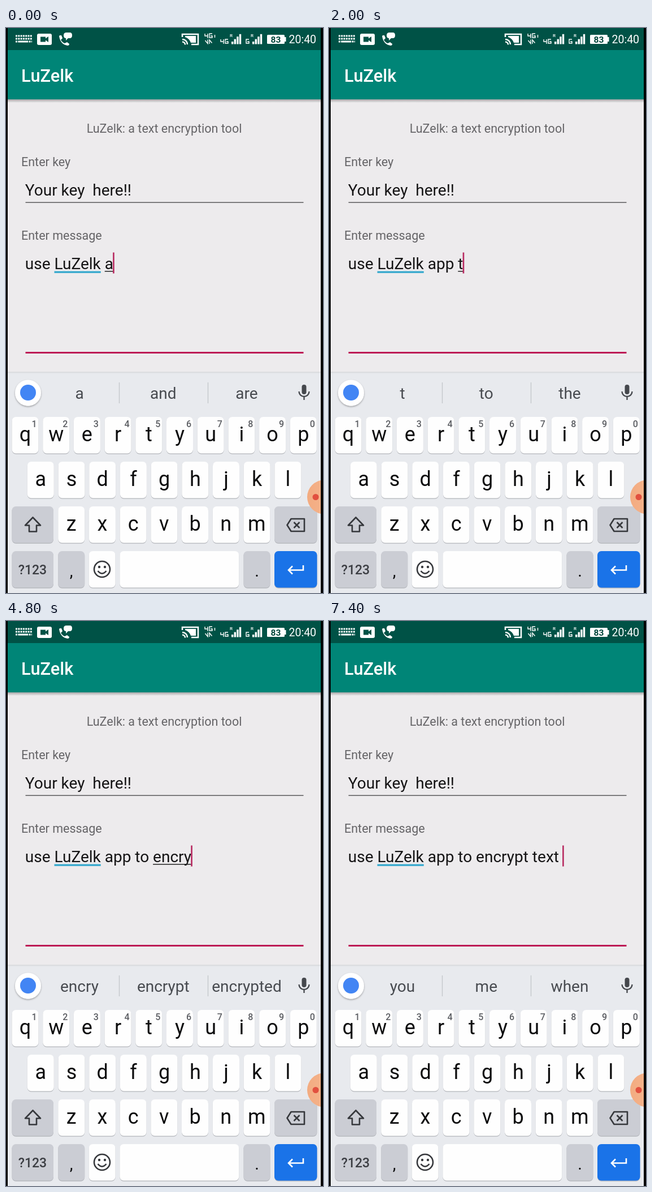
An HTML page that plays this animation: 561x998 px, repeating every 8 s.

```html
<!DOCTYPE html>
<html lang="en">
<head>
<meta charset="utf-8">
<title>Text encryption tool</title>
<style>
html, body { margin: 0; width: 100%; height: 100%; overflow: hidden; background: #000; }
svg { display: block; width: 100%; height: 100%; }
text { font-family: Roboto, sans-serif; white-space: pre; }
.mid { text-anchor: middle; }
.label { font-size: 21.5px; fill: #656467; }
.field { font-size: 28px; fill: #151415; }
.key { font-size: 36px; fill: #0c0c0d; }
.hint { font-size: 16px; font-weight: 500; fill: #5b5d62; }
.word { font-size: 28px; fill: #484b50; }
.line { fill: none; stroke: #36383c; stroke-width: 2.6; }
.tiny { font-size: 8px; font-weight: 500; }
</style>
</head>
<body>
<svg id="stage" viewBox="0 0 561 998" preserveAspectRatio="none">
  <defs>
    <clipPath id="screen"><rect x="3" width="554" height="998"/></clipPath>
    <linearGradient id="drop" x2="0" y2="1">
      <stop stop-color="#000" stop-opacity=".3"/><stop offset="1" stop-color="#000" stop-opacity="0"/>
    </linearGradient>
    <linearGradient id="peach">
      <stop stop-color="#f3ab80"/><stop offset="1" stop-color="#f6bb97"/>
    </linearGradient>
    <filter id="soft" x="-30%" y="-30%" width="160%" height="160%">
      <feDropShadow dx="0" dy="1.5" stdDeviation="1.8" flood-opacity=".35"/>
    </filter>
  </defs>
  <rect width="561" height="998"/>
  <g clip-path="url(#screen)">
    <rect width="561" height="998" fill="#edebed"/>
    <rect y="126" width="561" height="6" fill="url(#drop)"/>
    <rect y="39" width="561" height="87" fill="#008577"/>
    <rect width="561" height="39" fill="#005246"/>
    <g id="status" fill="#fff">
      <g fill="none" stroke="#fff" stroke-width="3">
        <path d="M17 14h29M17 19h29" stroke-dasharray="3 1.3"/>
        <path d="M17 24h29" stroke-dasharray="3 1.3 18 1.3"/>
      </g>
      <rect x="55" y="10" width="26" height="20" rx="3"/>
      <path d="M61 15.500h9v3l5-3.500v10l-5-3.500v3h-9z" fill="#005246"/>
      <path d="M94 14q2-2 4-1l2 5-3 3q3 5 7 6l4-2 4 3q0 3-3 3Q96 29 94 14z"/>
      <path d="M107 8h6q4 0 4 5t-4 5h-3l-4 4v-4q-4 0-4-5t5-5z"/>
      <path d="M312 16v-5h28v18h-12M312 20a9 9 0 0 1 9 9M312 24.500a5 5 0 0 1 5 5" fill="none" stroke="#fff" stroke-width="2.500"/>
      <path d="M317 14h19v12h-9a16 16 0 0 0-10-10z"/>
      <g fill="none" stroke="#fff" stroke-width="1.400">
        <path d="M352 10v4h5m0-4v8m8-8h-5v7h5v-3h-3M369.500 12v5"/>
        <path id="arrows" d="M352.500 22l4.500 5.500v-7M360 28v-7l4.500 5.500"/>
        <path d="M380 20v4h5m0-4v8m8-8h-5v7h5v-3h-3M430 20h-5v7h5v-3h-3"/>
      </g>
      <text class="tiny" x="396" y="16">R</text><text class="tiny" x="433" y="16">R</text>
      <rect x="462" y="12" width="31" height="16" rx="1.500"/><rect x="493" y="16" width="2.500" height="8"/>
      <text class="mid" x="477.500" y="25.500" font-size="15.500" font-weight="700" fill="#00463b">83</text>
      <text x="500.500" y="27" font-size="19.500">20:40</text>
    </g>
    <text x="27" y="95" font-size="30.800" font-weight="500" fill="#fff">LuZelk</text>
    <text class="label mid" x="280" y="185">LuZelk: a text encryption tool</text>
    <text class="label" x="27" y="244">Enter key</text>
    <text class="field" x="33.800" y="296">Your key  here!!</text>
    <rect x="34.500" y="307.500" width="492" height="1.300" fill="#454446"/>
    <text class="label" x="27" y="374">Enter message</text>
    <rect id="brand" y="429.500" height="3.300" fill="#36a9ce"/>
    <text id="message" class="field" x="33.800" y="426"></text>
    <rect id="compose" y="429" height="1.500" fill="#222"/>
    <rect id="caret" y="396.500" width="2.600" height="37" fill="#b82a60"/>
    <rect x="34.500" y="572" width="492" height="3" fill="#bd1a55"/>
    <rect y="607" width="561" height="3" fill="#dcdde0"/>
    <rect y="609.500" width="561" height="389" fill="#e8eaee"/>
    <circle cx="39" cy="644.500" r="23" fill="#fff" filter="url(#soft)"/>
    <circle cx="39" cy="644" r="14" fill="#4285f4"/>
    <path d="M200.500 626v37M357.500 626v37" stroke="#c3c6cb" stroke-width="1.300"/>
    <g id="words"></g>
    <rect x="523.500" y="630" width="8" height="17" rx="4" fill="#45484d"/>
    <path d="M518.500 642a9 9 0 0 0 18 0M527.500 651v6" fill="none" stroke="#45484d" stroke-width="2.300"/>
    <g id="keys"></g>
    <path class="line" d="M47.500 864.500L61 878.500H54V889.500H41V878.500H34z" stroke-linejoin="round"/>
    <path class="line" d="M504.500 867H528V889H504.500L497.500 878z" stroke-linejoin="round"/>
    <path class="line" d="M509.500 873l10 10m0-10l-10 10"/>
    <circle class="line" cx="170" cy="956" r="14"/>
    <circle cx="165" cy="952" r="2.200" fill="#36383c"/><circle cx="175" cy="952" r="2.200" fill="#36383c"/>
    <path class="line" d="M162.500 959q7.500 9 15 0" stroke-width="2.300"/>
    <path d="M526 949v8.500H500M507 950.500l-7 7 7 7" fill="none" stroke="#fff" stroke-width="2.600"/>
    <circle cx="563" cy="828.500" r="30" fill="url(#peach)"/>
    <circle cx="548" cy="828.500" r="5.500" fill="#e2503f"/>
    <g id="popup">
      <rect width="60" height="175" rx="6" fill="#cbcdd4" filter="url(#soft)"/>
      <text class="key mid" x="30" y="57.500"></text>
      <g fill="#222"><circle cx="39.500" cy="77.500" r="1.500"/><circle cx="45" cy="77.500" r="1.500"/><circle cx="50.500" cy="77.500" r="1.500"/></g>
    </g>
  </g>
</svg>
<script>
const LOOP = 8000, PITCH = 54.7, KEY_W = 47, KEY_H = 64.5, TEXT_X = 33.8, BRAND = "LuZelk";
const $ = id => document.getElementById(id);
const spots = {};

function add(parent, tag, attrs, content = "") {
  const el = document.createElementNS("http://www.w3.org/2000/svg", tag);
  for (const name in attrs) el.setAttribute(name, attrs[name]);
  el.textContent = content;
  parent.append(el);
  return el;
}

function label(parent, cls, x, y, content) {
  return add(parent, "text", { class: cls + " mid", x, y }, content);
}

function cap(x, y, width, fill = "#fefefe") {
  const box = { x, width, height: KEY_H, rx: 7 };
  add($("keys"), "rect", { ...box, y: y + 1.3, fill: "#b3b5ba" });
  return add($("keys"), "rect", { ...box, y, fill });
}

function letters(row, left, top) {
  [...row].forEach((char, i) => {
    const x = left + i * PITCH, center = x + KEY_W / 2;
    cap(x, top, KEY_W);
    label($("keys"), "key", center, top + 42.5, char);
    if (top < 700) label($("keys"), "hint", center + 16, top + 18, (i + 1) % 10);
    spots[char] = [center - 30, top - 110];
  });
}

const GREY = "#cbcdd4";
letters("qwertyuiop", 10.5, 687);
letters("asdfghjkl", 37.8, 766);
letters("zxcvbnm", 92.2, 845);
cap(10.5, 845, 73.5, GREY);
cap(475, 845, 75.5, GREY);
cap(10.5, 924, 73.5, GREY);
cap(92.2, 924, KEY_W, GREY);
cap(146.6, 924, KEY_W);
const space = cap(201.3, 924, 211);
cap(420.5, 924, KEY_W, GREY);
cap(475, 924, 75.5, "#1a73e8");
add($("keys"), "text", { class: "mid", x: 47, y: 965, "font-size": 23, "font-weight": 500, fill: "#3c3e43" }, "?123");
label($("keys"), "key", 115.7, 969, ",").style.fontSize = "29px";
label($("keys"), "key", 444, 969, ".").style.fontSize = "29px";

// Signal bars
for (const x of [399, 436])
  for (let i = 0; i < 4; i++)
    add($("status"), "rect", { x: x + i * 4.6, y: 24 - i * 4.4, width: 3.4, height: 4.5 + i * 4.4 });

const words = [130, 278.3, 426].map(x => label($("words"), "word", x, 655, ""));

// Time, text after the brand, word being composed, suggestions, pressed key, caret hidden
const steps = [
  [0, " ", "a", "a and are"],
  [400, " ", "a", "a and are", "p"],
  [600, " ", "ap", "ap app apple", "p"],
  [800, " ", "app", "app apple apps"],
  [1000, " ", "app", "app apple apps", "space"],
  [1200, " app ", "", "is and on"],
  [1600, " app ", "", "is and on", "t"],
  [1800, " app ", "t", "is and on"],
  [2000, " app ", "t", "t to the"],
  [2400, " app ", "t", "t to the", "", true],
  [2600, " app ", "t", "t to the", "o"],
  [2800, " app ", "to", "t to the"],
  [3000, " app ", "to", "to today too"],
  [3200, " app ", "to", "to today too", "space"],
  [3400, " app to ", "", "the be get"],
  [3600, " app to ", "", "the be get", "e"],
  [3800, " app to ", "e", "e even every", "n"],
  [4000, " app to ", "en", "en enjoy end", "c"],
  [4200, " app to ", "enc", "enc encounter encourage", "r"],
  [4400, " app to ", "encr", "encr encrypt encrypted"],
  [4600, " app to ", "encr", "encr encrypt encrypted", "y"],
  [4800, " app to ", "encry", "encry encrypt encrypted"],
  [5200, " app to ", "encryp", "encryp encrypt encrypted", "t"],
  [5400, " app to ", "encrypt", "encrypt encrypted encrypts"],
  [5600, " app to encrypt ", "", "to the is"],
  [6200, " app to encrypt ", "", "to the is", "t"],
  [6400, " app to encrypt ", "t", "t to the"],
  [6600, " app to encrypt ", "t", "t to the", "e"],
  [6800, " app to encrypt ", "te", "te text tell", "x"],
  [7000, " app to encrypt ", "tex", "tex text texts", "t"],
  [7200, " app to encrypt ", "text", "text texts texting"],
  [7400, " app to encrypt text ", "", "you me when"]
];

const message = $("message");
const edge = count => TEXT_X + (count ? message.getSubStringLength(0, count) : 0);

function underline(id, from, to) {
  const x = edge(from);
  $(id).setAttribute("x", x);
  $(id).setAttribute("width", edge(to) - x);
}

function show([time, tail, composing, suggestions, pressed, hidden]) {
  const done = "use " + BRAND + tail, full = done + composing;
  message.textContent = full;
  underline("brand", 4, 4 + BRAND.length);
  underline("compose", done.length, full.length);
  $("caret").setAttribute("x", edge(full.length) - 0.8);
  $("caret").style.opacity = hidden ? 0 : 1;
  suggestions.split(" ").forEach((word, i) => words[i].textContent = word);
  space.setAttribute("fill", pressed === "space" ? "#e2e3e5" : "#fefefe");
  $("arrows").style.opacity = time >= 3800 && time < 4400 ? 0.4 : 1;
  const spot = spots[pressed];
  $("popup").style.display = spot ? "" : "none";
  if (spot) {
    $("popup").setAttribute("transform", `translate(${spot})`);
    $("popup").querySelector("text").textContent = pressed;
  }
}

let current;
function tick() {
  const now = performance.now() % LOOP;
  const step = steps.findLast(([time]) => time <= now);
  if (step !== current) show(current = step);
  requestAnimationFrame(tick);
}
tick();
</script>
</body>
</html>
```
